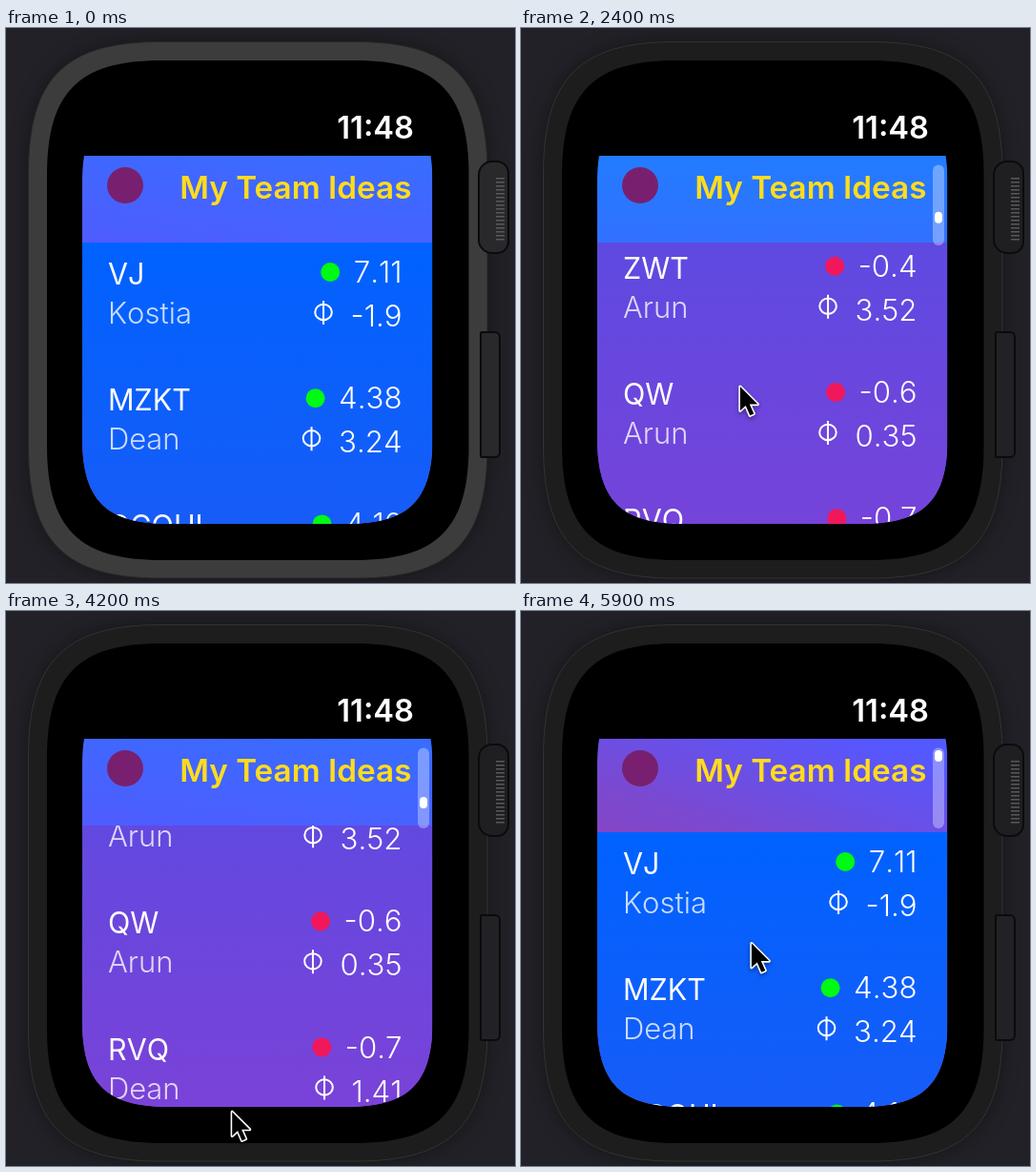
These frames come from a looping animation (534 by 582 pixels, 6 s). An HTML page with a canvas:

```html
<!DOCTYPE html>
<html lang="en">
<head>
<meta charset="utf-8">
<title>Watch list</title>
<style>
html, body { margin: 0; width: 534px; height: 582px; overflow: hidden; background: #212127; }
canvas { display: block; }
</style>
</head>
<body>
<canvas id="stage" width="534" height="582"></canvas>
<script>
const ctx = document.getElementById('stage').getContext('2d');
const LOOP = 6000, STEP = 100;
const SCREEN = { x: 80, y: 134, w: 367.5, h: 386 };
const LIST_TOP = 225, PITCH = 132.2, LIST_LENGTH = 1957, SCROLL_MAX = 1763;

const rows = `VJ Kostia 7.11 -1.9
MZKT Dean 4.38 3.24
OCQUL Dean 4.16 1.82
HQZ Arun 2.05 0.47
ZAQ Kostia 0.15 -0.7
PIIX Dean 0.13 -1.0
FEXQ Rakesh 0.0 0.39
XFE Arun 0.0 1.24
DXJ Rakesh -0.2 2.10
ZWT Arun -0.4 3.52
QW Arun -0.6 0.35
RVQ Dean -0.7 1.41
UZQ Rakesh -0.8 0.76
KXJ Kostia -0.8 6.58
WQK Kostia -1.3 0.86`.split('\n').map(line => line.split(' '));

// Key points are [time, value]; the curve between them never overshoots.
const scrollKeys = [
  [0, 0], [1000, 0], [1700, 508], [2400, 1196], [3100, SCROLL_MAX],
  [3800, 1672], [4600, 664], [5300, 0], [5450, -45], [5900, -7]
];
const cursorTurns = [
  [400, 93], [1200, 470], [1750, 152], [2250, 450], [2700, 150], [3390, 150],
  [4100, 560], [4520, 290], [4850, 535], [5250, 250], [5500, 480], [6000, 329]
];

function curve(keys, t) {
  const slope = i => keys[i + 1] && keys[i]
    ? (keys[i + 1][1] - keys[i][1]) / (keys[i + 1][0] - keys[i][0]) : 0;
  const tangent = i => {
    const a = slope(i - 1), b = slope(i);
    return a * b > 0 ? 2 * a * b / (a + b) : 0;
  };
  const next = keys.findIndex(key => key[0] > t);
  if (next < 0) return keys[keys.length - 1][1];
  if (next === 0) return keys[0][1];
  const i = next - 1, [t0, v0] = keys[i], [t1, v1] = keys[next];
  const span = t1 - t0, k = (t - t0) / span, ease = k * k * (3 - 2 * k);
  return v0 + (v1 - v0) * ease
    + span * k * (1 - k) * ((1 - k) * tangent(i) - k * tangent(next));
}

function cursorAt(t) {
  const entry = Math.max(0, 1 - (t - 400) / 500);
  const sway = 6 * Math.cos(2 * Math.PI * (t - 1700) / 1400);
  return [233 + sway + 265 * entry * entry, curve(cursorTurns, t)];
}

function backdropShift(t) {
  return 0.36 * Math.max(0, 1 - t / 1400) + 0.28 * Math.max(0, (t - 2900) / 1000);
}

// Rectangle with continuous corners that reach e pixels along each side.
function squircle(x, y, w, h, e) {
  const c = e * 0.277, r = x + w, b = y + h;
  ctx.beginPath();
  ctx.moveTo(x + e, y);
  ctx.lineTo(r - e, y);
  ctx.bezierCurveTo(r - c, y, r, y + c, r, y + e);
  ctx.lineTo(r, b - e);
  ctx.bezierCurveTo(r, b - c, r - c, b, r - e, b);
  ctx.lineTo(x + e, b);
  ctx.bezierCurveTo(x + c, b, x, b - c, x, b - e);
  ctx.lineTo(x, y + e);
  ctx.bezierCurveTo(x, y + c, x + c, y, x + e, y);
  ctx.closePath();
}

function paint(fill, stroke, lineWidth = 1) {
  if (fill) { ctx.fillStyle = fill; ctx.fill(); }
  if (stroke) { ctx.strokeStyle = stroke; ctx.lineWidth = lineWidth; ctx.stroke(); }
}

function box(x, y, w, h, r, fill, stroke, lineWidth) {
  ctx.beginPath();
  ctx.roundRect(x, y, w, h, r);
  paint(fill, stroke, lineWidth);
}

function label(text, x, y, size, weight, color, align = 'left') {
  ctx.font = `${weight} ${size}px Inter, sans-serif`;
  ctx.textAlign = align;
  ctx.fillStyle = color;
  ctx.fillText(text, x, y);
  return ctx.measureText(text).width;
}

function dot(x, y, r, color) {
  ctx.beginPath();
  ctx.arc(x, y, r, 0, 7);
  paint(color);
}

function drawCase(active) {
  ctx.fillStyle = '#212127';
  ctx.fillRect(0, 0, 534, 582);
  ctx.save();
  ctx.shadowColor = 'rgba(0,0,0,.4)';
  ctx.shadowBlur = 20;
  squircle(23.5, 14.5, 481.5, 562.5, 138);
  paint(active ? '#1d1d1e' : '#3c3c3c');
  ctx.restore();
  paint(null, active ? '#333335' : '#27272a');
  squircle(43, 34, 442.5, 524, 120);
  paint('#000');
  box(496, 140, 31, 96, [14, 12, 12, 14], active ? '#1f1f22' : '#29292c', '#0b0b0d', 2);
  ctx.fillStyle = '#59595c';
  for (let y = 157; y < 222; y += 4) ctx.fillRect(514, y, 9, 1.5);
  box(498, 319, 20, 131, [1, 5, 5, 1], active ? '#222226' : '#29292c', '#0b0b0d', 2);
  label('11:48', 428, 116, 32.7, 600, '#fff', 'right');
}

function drawBackdrop(shift) {
  const top = SCREEN.y - shift * SCREEN.h;
  const tilt = shift * 120;
  const g = ctx.createLinearGradient(264 + tilt, top, 264 - tilt, top + SCREEN.h * 1.6);
  g.addColorStop(0, '#227cff');
  g.addColorStop(0.48, '#5657ff');
  g.addColorStop(0.68, '#7b49d0');
  g.addColorStop(1, '#a03caa');
  ctx.fillStyle = g;
  ctx.fillRect(SCREEN.x, SCREEN.y, SCREEN.w, SCREEN.h);
}

function drawPhi(x, y) {
  ctx.beginPath();
  ctx.ellipse(x, y, 8.8, 8.2, 0, 0, 7);
  ctx.moveTo(x, y - 12);
  ctx.lineTo(x, y + 13);
  paint(null, '#fff', 2);
}

function drawRow([name, owner, value, ratio], y) {
  label(name, 107, y + 44, 30.5, 400, '#fff');
  label(owner, 107, y + 85, 31, 300, 'rgba(255,255,255,.78)');
  const valueWidth = label(value, 415.5, y + 42, 31.2, 300, '#fff', 'right');
  dot(391 - valueWidth, y + 31, 10, value > 1 ? '#00fa14' : '#f0185a');
  const ratioWidth = label(ratio, 415.5, y + 88, 31.2, 300, '#fff', 'right');
  drawPhi(387 - ratioWidth, y + 73);
}

function drawList(scroll) {
  const top = LIST_TOP - scroll;
  ctx.save();
  ctx.beginPath();
  ctx.rect(SCREEN.x, LIST_TOP, SCREEN.w, 300);
  ctx.clip();
  const g = ctx.createLinearGradient(0, top, 0, top + LIST_LENGTH);
  g.addColorStop(0, '#0062ff');
  g.addColorStop(1, '#9a3ace');
  ctx.fillStyle = g;
  ctx.fillRect(SCREEN.x, top, SCREEN.w, LIST_LENGTH);
  ctx.fontKerning = 'none';
  rows.forEach((row, i) => {
    const y = top + i * PITCH;
    if (y > 90 && y < 530) drawRow(row, y);
  });
  ctx.restore();
}

function drawScrollBar(scroll) {
  box(432, 143.5, 12, 84.5, 6, 'rgba(255,255,255,.33)');
  const y = 152 + 69 * Math.min(1, Math.max(0, scroll / SCROLL_MAX));
  box(434, y - 6, 8, 12, 4, '#fff');
}

function drawCursor([x, y]) {
  ctx.save();
  ctx.translate(x + 2, y + 3);
  ctx.scale(0.9, 0.9);
  ctx.beginPath();
  [[1, 1], [1, 29], [7.5, 23], [12.5, 34.5], [17, 32.5], [12, 21.5], [21.5, 21.5]]
    .forEach(point => ctx.lineTo(...point));
  ctx.closePath();
  ctx.lineJoin = 'round';
  ctx.shadowColor = 'rgba(0,0,0,.4)';
  ctx.shadowBlur = 4;
  ctx.shadowOffsetY = 2;
  paint(null, '#fff', 3.5);
  ctx.shadowColor = 'transparent';
  paint('#000');
  ctx.restore();
}

function draw(t) {
  const scroll = curve(scrollKeys, t);
  drawCase(t >= 900);
  ctx.save();
  ctx.beginPath();
  ctx.rect(SCREEN.x, SCREEN.y, SCREEN.w, SCREEN.h);
  ctx.clip();
  squircle(SCREEN.x, 72, SCREEN.w, 448, 90);
  ctx.clip();
  drawBackdrop(backdropShift(t));
  drawList(scroll);
  dot(125, 165, 19, '#78206f');
  label('My Team Ideas', 425.5, 179, 33.3, 600, '#ffdc1e', 'right');
  if (t >= 1100) drawScrollBar(scroll);
  ctx.restore();
  if (t >= 400) drawCursor(cursorAt(t));
}

const start = performance.now();
function tick() {
  const elapsed = (performance.now() - start) % LOOP;
  draw(Math.floor(elapsed / STEP) * STEP);
  requestAnimationFrame(tick);
}
tick();
</script>
</body>
</html>
```
